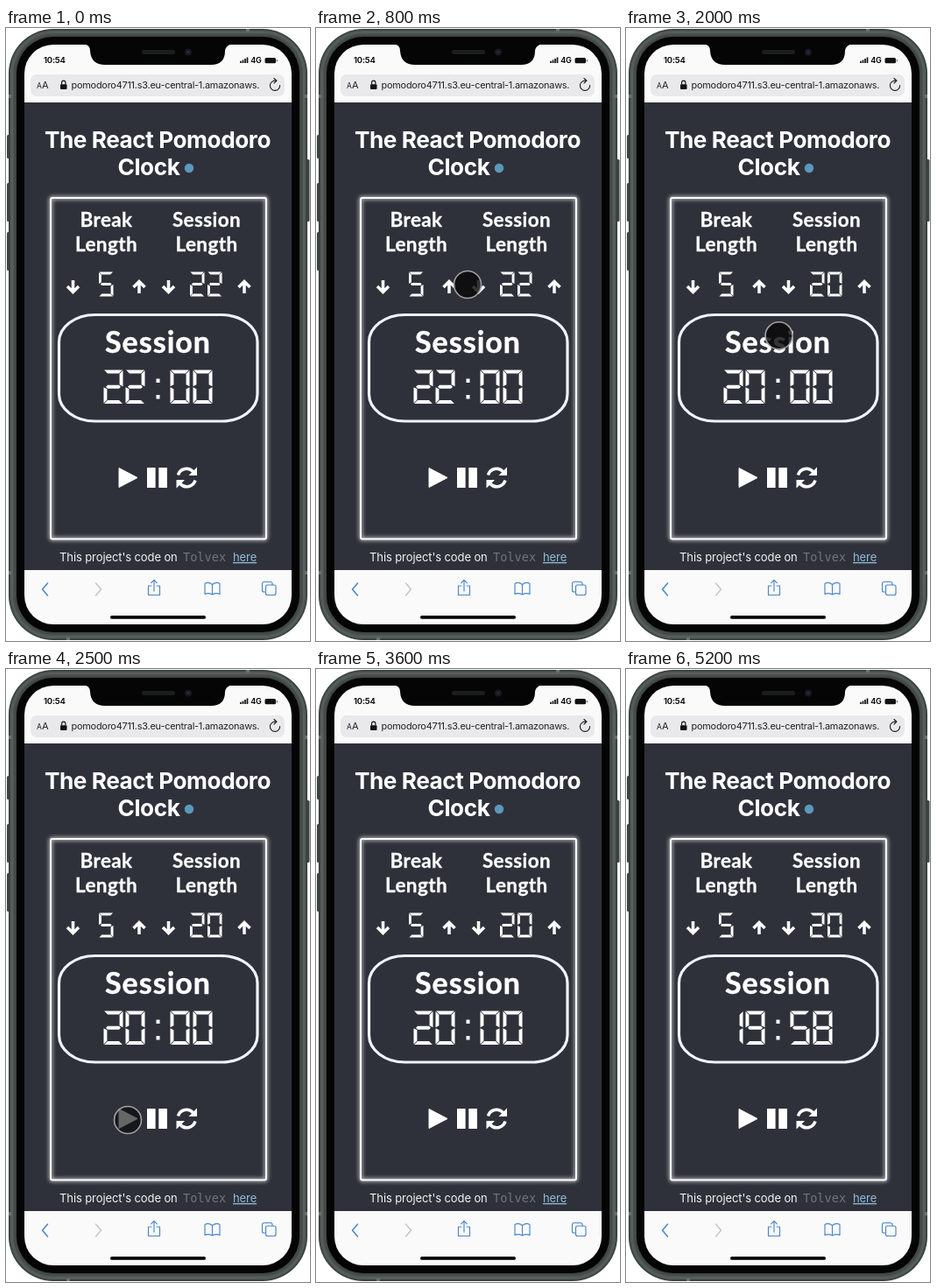
An HTML page that plays this animation: 347 px wide and 700 px high, repeating every 5.3 s.

```html
<!DOCTYPE html>
<html lang="en">
<head>
<meta charset="utf-8">
<title>Pomodoro clock</title>
<style>
html, body { margin: 0; width: 100%; height: 100%; overflow: hidden; background: #fff; }
svg { display: block; width: 100vw; height: 100vh; }
text { font-family: Inter, sans-serif; }
.mid { text-anchor: middle; }
.title { font-size: 26.2px; font-weight: 700; fill: #fff; letter-spacing: -.45px; }
.label { font: 700 22.5px Lato, sans-serif; fill: #fff; stroke: #fff; stroke-width: .3px; letter-spacing: .4px; }
.big { font-size: 34px; letter-spacing: 1px; stroke-width: .5px; }
.line { fill: none; stroke-linecap: round; stroke-linejoin: round; }
.blue { stroke: #4a86cb; stroke-width: 1.15; }
</style>
</head>
<body>
<svg viewBox="0 0 347 700" xmlns="http://www.w3.org/2000/svg">
  <defs>
    <filter id="glow" x="-10%" y="-10%" width="120%" height="120%">
      <feGaussianBlur stdDeviation="2"/>
    </filter>
    <filter id="soft"><feGaussianBlur stdDeviation=".9"/></filter>
    <clipPath id="screen"><rect x="21" y="19" width="305" height="662" rx="33"/></clipPath>
    <path id="arrow" fill="none" stroke="#fff" stroke-width="3.5" d="M0-7.500V6M-6.500-.5L0 6L6.500-.5"/>
  </defs>

  <!-- phone body -->
  <g fill="#3b4441">
    <rect x="1" y="122" width="5" height="27" rx="1.5"/>
    <rect x="1" y="177" width="5" height="44" rx="1.5"/>
    <rect x="1" y="233" width="5" height="44" rx="1.5"/>
    <rect x="341" y="150" width="5.5" height="71" rx="1.5"/>
  </g>
  <rect x="3" y="1" width="341" height="698" rx="51" fill="#333b38"/>
  <path d="M3 78h5M339 78h5M3 622h5M339 622h5M276 1v4M71 695v4" stroke="#717a76" stroke-width="4"/>
  <g fill="none" filter="url(#soft)">
    <rect x="6.5" y="4.500" width="334" height="691" rx="47.5" stroke="#5d6563" stroke-width="3"/>
    <rect x="10" y="8" width="327" height="684" rx="44" stroke="#454c4a" stroke-width="4"/>
  </g>
  <rect x="12" y="10" width="323" height="680" rx="42" fill="#050505"/>

  <!-- browser -->
  <g clip-path="url(#screen)">
    <rect x="21" y="19" width="305" height="662" fill="#fafafa"/>
    <rect x="21" y="85" width="305" height="534" fill="#2f313a"/>
  </g>
  <path d="M88 18Q96 19 96 26Q97 42 113 42H234Q250 42 250 26Q251 19 259 18Z" fill="#050505"/>
  <rect x="155" y="25" width="38" height="5" rx="2.5" fill="#1c1d20"/>
  <circle cx="208" cy="27.5" r="4" fill="#17191f"/>
  <circle cx="208" cy="27.5" r="1.7" fill="#252b3c"/>

  <text x="43" y="40.3" font-size="9.6" font-weight="600" letter-spacing="-.2">10:54</text>
  <path d="M268 40v-2.3M270.5 40v-3.5M273 40v-5M275.5 40v-6.5" stroke="#111" stroke-width="1.7"/>
  <text x="279.3" y="40.3" font-size="9" font-weight="600" letter-spacing="-.2">4G</text>
  <rect x="295.5" y="34" width="12.5" height="6.3" rx="1.6" fill="#111"/>
  <path d="M309.3 36v2.4" stroke="#555" stroke-width="1"/>

  <rect x="28" y="53" width="290" height="25" rx="7" fill="#e9e9eb"/>
  <text x="35" y="69.3" font-size="8.5" fill="#222">A</text>
  <text x="41" y="69.3" font-size="11" fill="#222">A</text>
  <rect x="62" y="64.2" width="7.5" height="5.8" rx="1" fill="#111"/>
  <path class="line" d="M63.6 64v-1.6a2.15 2.3 0 0 1 4.3 0v1.6" stroke="#111" stroke-width="1.1"/>
  <text x="74.5" y="69.3" font-size="10.9" letter-spacing="-.22" fill="#222">pomodoro4711.s3.eu-central-1.amazonaws.</text>
  <path class="line" d="M312.600 65.500A5.600 5.600 0 1 1 307.500 60.200M306 57.500L309 60.200L306 63" stroke="#222" stroke-width="1.15"/>

  <!-- page -->
  <text class="title mid" x="173" y="136.5">The React Pomodoro</text>
  <text class="title mid" x="163" y="168">Clock</text>
  <circle cx="209" cy="160" r="5.2" fill="#5b98bb"/>

  <rect x="51" y="194" width="246" height="389.5" rx="2" fill="none" stroke="#fff" stroke-width="4.5" opacity=".6" filter="url(#glow)"/>
  <rect x="51" y="194" width="246" height="389.5" rx="2" fill="none" stroke="#fff" stroke-width="2"/>

  <text class="label mid" x="114.5" y="227">Break</text>
  <text class="label mid" x="114.5" y="255">Length</text>
  <text class="label mid" x="229" y="227">Session</text>
  <text class="label mid" x="229" y="255">Length</text>

  <use href="#arrow" transform="translate(76.500 295.500)"/>
  <use href="#arrow" transform="translate(152 295.5) scale(1 -1)"/>
  <use href="#arrow" transform="translate(185.5 295.500)"/>
  <use href="#arrow" transform="translate(272 295.5) scale(1 -1)"/>

  <rect x="60.500" y="327.5" width="226.500" height="121.5" rx="41" ry="31" fill="none" stroke="#eff3fc" stroke-width="3.2"/>
  <text class="label big mid" x="173.5" y="370.5">Session</text>
  <path id="digits" fill="#fff"/>
  <path d="M171.5 400.5h4v4.500h-4zM171.5 419h4v4.500h-4z" fill="#fff"/>

  <path d="M129 502.5L150 513.5L129 524.5Z" fill="#fff" stroke="#fff" stroke-linejoin="round"/>
  <path d="M161 502h9.6v23h-9.6zM174.3 502h9.6v23h-9.6z" fill="#fff"/>
  <path d="M196.500 510.500A10 10 0 0 1 213.500 506.500M216 516.500A10 10 0 0 1 199 520.500" fill="none" stroke="#fff" stroke-width="3.5"/>
  <path d="M218 501.500v9.5h-9.5zM194.500 525.500v-9.5h9.5z" fill="#fff"/>

  <text x="61" y="609" font-size="13" letter-spacing="-.1" fill="#f4f4f5">This project's code on</text>
  <text x="202" y="609" font-size="13.6" fill="#70737a" style="font-family:'DejaVu Sans Mono',monospace">Tolvex</text>
  <text x="259" y="609" font-size="13" letter-spacing="-.1" fill="#8dbdd8" text-decoration="underline">here</text>

  <!-- toolbar -->
  <g class="line blue">
    <path d="M47.5 634L41.5 641L47.5 648" stroke-width="1.5"/>
    <path d="M102.5 634L108.5 641L102.5 648" stroke="#c5c6ca" stroke-width="1.5"/>
    <path d="M166 637h-3.5v10.5h13V637h-3.5M169 643V630.5M165.7 633.6L169 630.3L172.3 633.6"/>
    <path d="M235.5 635.5Q231 632 227 634.5V646.5Q231 644.5 235.5 647Q240 644.5 244 646.5V634.5Q240 632 235.5 635.5V647"/>
    <rect x="296.5" y="636" width="11.5" height="11.5" rx="2"/>
    <path d="M296.5 644h-2a2 2 0 0 1-2-2v-7.5a2 2 0 0 1 2-2h7.5a2 2 0 0 1 2 2v1.5"/>
  </g>
  <rect x="119" y="671" width="109" height="3.8" rx="1.9"/>

  <g id="cursor">
    <circle id="disc" r="15.5" fill="#080808"/>
    <circle r="15.5" fill="none" stroke="#a3a3a3" stroke-width="1.6"/>
  </g>
</svg>
<script>
const LOOP = 5300, STEP = 100;
const $ = id => document.getElementById(id);
const LIT = ['abcdef', 'bc', 'abged', 'abgcd', 'fgbc', 'afgcd', 'afgedc', 'abc', 'abcdefg', 'abcdfg'];

// Seven-segment digit as path data
function digit(n, x, y, w, h, t) {
  const m = h / 2, g = t * .15;
  const top = [[g, 0], [w - g, 0], [w - t - g, t], [t + g, t]];
  const side = [[0, g], [t, t + g], [t, m - t / 2 - g], [0, m - g]];
  const bar = [[t / 2 + g, m], [t + g, m - t / 2], [w - t - g, m - t / 2],
               [w - t / 2 - g, m], [w - t - g, m + t / 2], [t + g, m + t / 2]];
  const flipX = p => p.map(([a, b]) => [w - a, b]);
  const flipY = p => p.map(([a, b]) => [a, h - b]);
  const segs = { a: top, d: flipY(top), f: side, b: flipX(side),
                 e: flipY(side), c: flipY(flipX(side)), g: bar };
  return [...LIT[n]].map(s =>
    'M' + segs[s].map(([a, b]) => (x + a).toFixed(2) + ' ' + (y + b).toFixed(2)).join('L') + 'Z').join('');
}

const small = (n, x) => digit(n, x, 278.5, 16.5, 28, 2.9);
const large = (n, x) => digit(n, x, 390.5, 22, 38.5, 3.9);
const pair = n => [Math.floor(n / 10), n % 10];

// time, x, y, opacity
const PATH = [
  [500, 118, 332, 0], [600, 132, 317, 1], [800, 173, 293, 1], [900, 187, 294, 1],
  [1800, 187, 294, 1], [2400, 139, 515, 1], [2900, 139, 515, 1],
  [3200, 232, 476, 1], [3500, 300, 440, 0]
];

function cursorAt(t) {
  const i = PATH.findIndex(p => p[0] > t);
  if (i < 1) return { x: 0, y: 0, alpha: 0 };
  const [a, b] = [PATH[i - 1], PATH[i]];
  const u = (t - a[0]) / (b[0] - a[0]), k = u * u * (3 - 2 * u);
  const [x, y, alpha] = [1, 2, 3].map(j => a[j] + (b[j] - a[j]) * k);
  return { x, y, alpha, resting: a[1] === b[1] };
}

function render(t) {
  const length = t < 1100 ? 22 : t < 1500 ? 21 : 20;
  const ticks = t < 3700 ? 0 : t < 4700 ? 1 : 2;
  const left = length * 60 - ticks;
  const [l1, l2] = pair(length), [m1, m2] = pair(Math.floor(left / 60)), [s1, s2] = pair(left % 60);
  $('digits').setAttribute('d',
    small(5, 106) + small(l1, 210) + small(l2, 230) +
    large(m1, 111.5) + large(m2, 136.5) + large(s1, 187.5) + large(s2, 213.5));

  const { x, y, alpha, resting } = cursorAt(t);
  $('cursor').setAttribute('transform', `translate(${x} ${y})`);
  $('cursor').setAttribute('opacity', alpha);
  $('disc').setAttribute('opacity', resting ? .62 : .82);
}

let start;
function frame(now) {
  start ??= now;
  render(Math.floor((now - start) % LOOP / STEP) * STEP);
  requestAnimationFrame(frame);
}
render(0);
requestAnimationFrame(frame);
</script>
</body>
</html>
```
